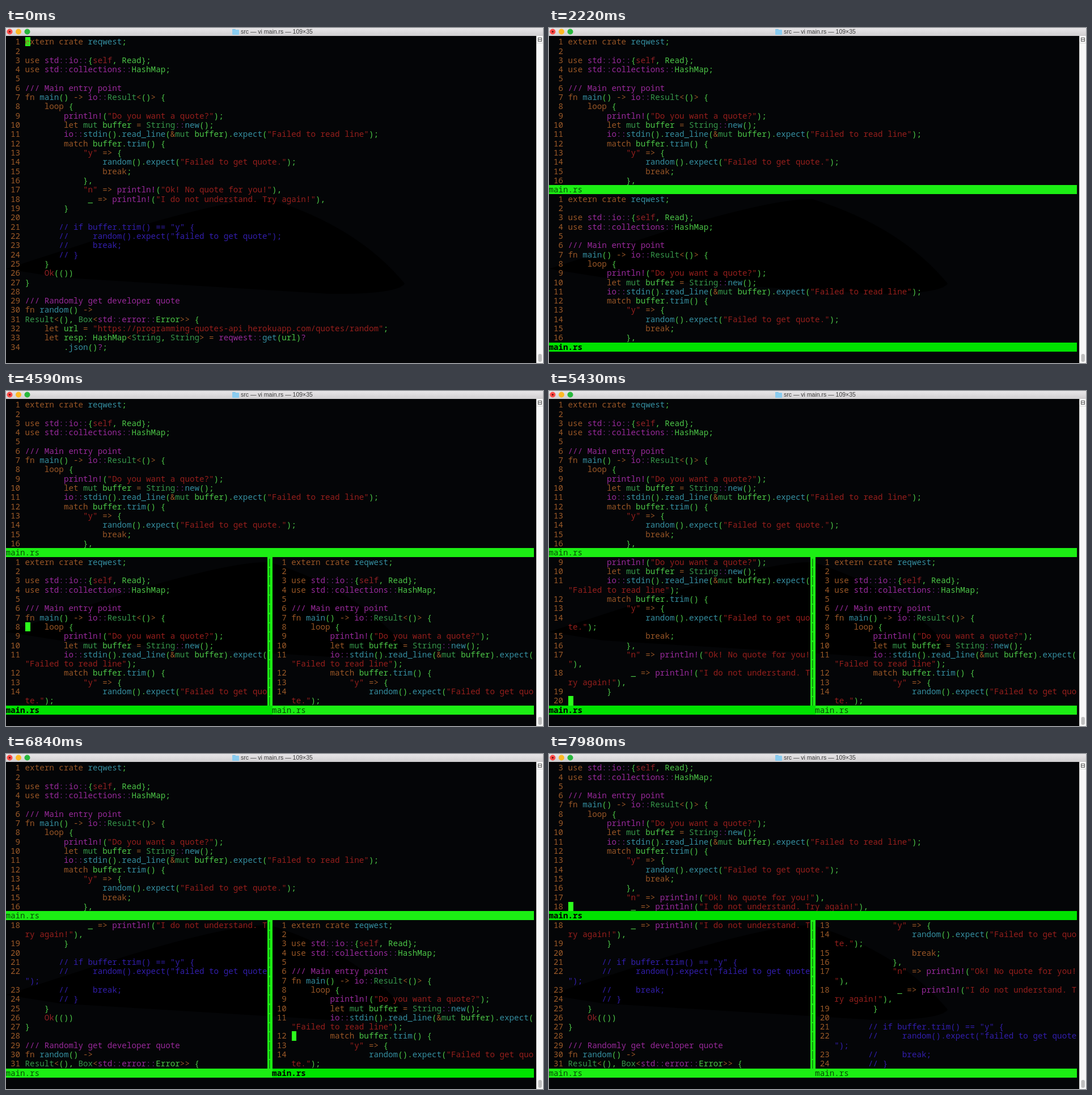
An HTML page with a canvas for the animation above (8 s loop, 947x591 px).

```html
<!DOCTYPE html>
<html lang="en">
<head>
<meta charset="utf-8">
<title>vi split windows</title>
<style>
  html, body { margin: 0; width: 100%; height: 100%; overflow: hidden; background: #000; }
  canvas { display: block; }
</style>
</head>
<body>
<canvas id="stage" width="947" height="591"></canvas>
<script>
const ctx = document.getElementById('stage').getContext('2d');
const LOOP = 8000;
const COLS = 109, CELL_W = 8.54, CELL_H = 16.32, TOP = 16;
const NUMBER_COLS = 4;
const FONT = '14.23px "Noto Sans Mono", "DejaVu Sans Mono", monospace';

const COLORS = {
  doc: '#98299a', comment: '#321eac', string: '#961f1c', keyword: '#985626',
  special: '#932225', type: '#36964a', path: '#982a9c', colons: '#6b267e',
  call: '#358ea0', plain: '#4cc647', number: '#9c5a28'
};
const ACTIVE_BAR = '#00e200', IDLE_BAR = '#1cee14', CURSOR = '#2cff1c';

const TOKEN = new RegExp([
  '(?<doc>///.*)', '(?<comment>//.*)', '(?<string>"[^"]*")',
  '(?<keyword>\\b(?:extern|crate|use|fn|loop|let|match|break)\\b|->|=>|[=<>&])',
  '(?<special>\\b(?:self|Ok)\\b)', '(?<type>\\b(?:mut|Result|String|Box)\\b)',
  '(?<path>\\w+!|\\w+(?=::)|\\?)', '(?<colons>::)',
  '(?<call>\\w+(?=\\()|reqwest)', '(?<plain>\\w+|.)'
].join('|'), 'g');

const SOURCE = `extern crate reqwest;

use std::io::{self, Read};
use std::collections::HashMap;

/// Main entry point
fn main() -> io::Result<()> {
    loop {
        println!("Do you want a quote?");
        let mut buffer = String::new();
        io::stdin().read_line(&mut buffer).expect("Failed to read line");
        match buffer.trim() {
            "y" => {
                random().expect("Failed to get quote.");
                break;
            },
            "n" => println!("Ok! No quote for you!"),
             _ => println!("I do not understand. Try again!"),
        }

       // if buffer.trim() == "y" {
       //     random().expect("failed to get quote");
       //     break;
       // }
    }
    Ok(())
}

/// Randomly get developer quote
fn random() ->
Result<(), Box<std::error::Error>> {
    let url = "https://programming-quotes-api.herokuapp.com/quotes/random";
    let resp: HashMap<String, String> = reqwest::get(url)?
        .json()?;`;

// Each line becomes a list of coloured characters.
const LINES = SOURCE.split('\n').map(line =>
  [...line.matchAll(TOKEN)].flatMap(({ 0: text, groups }) => {
    const kind = Object.keys(groups).find(name => groups[name] !== undefined);
    return [...text].map(char => ({ char, color: COLORS[kind] }));
  }));

const cellX = col => col * CELL_W;
const cellY = row => TOP + row * CELL_H;

function fillCells(row, col, width, color) {
  const x = Math.round(cellX(col)), y = Math.round(cellY(row));
  ctx.fillStyle = color;
  ctx.fillRect(x, y, Math.round(cellX(col + width)) - x, Math.round(cellY(row + 1)) - y);
}

function drawText(text, row, col, color, weight = 300) {
  ctx.font = `${weight} ${FONT}`;
  ctx.fillStyle = color;
  ctx.fillText(text, cellX(col) - 0.6, cellY(row) + 13.2);
}

function rowsOf(line, width) {
  return Math.max(1, Math.ceil(LINES[line - 1].length / (width - NUMBER_COLS)));
}

// First visible line that keeps the cursor line fully inside the window.
function firstLine({ line, width, height }) {
  let top = line, used = rowsOf(line, width);
  while (top > 1 && used + rowsOf(top - 1, width) <= height) used += rowsOf(--top, width);
  return top;
}

function drawWindow(win, active, cursorOn) {
  const { row, col, width, height, line: cursorLine } = win;
  const textCols = width - NUMBER_COLS;
  let used = 0;
  for (let line = firstLine(win); line <= LINES.length && used < height; line++) {
    const rows = rowsOf(line, width);
    if (used + rows > height) {
      for (; used < height; used++) drawText('@', row + used, col, COLORS.comment);
      break;
    }
    if (active && cursorOn && line === cursorLine) {
      fillCells(row + used, col + NUMBER_COLS, 1, CURSOR);
    }
    drawText(String(line).padStart(3), row + used, col, COLORS.number);
    LINES[line - 1].forEach(({ char, color }, i) => {
      if (char === ' ') return;
      drawText(char, row + used + Math.floor(i / textCols), col + NUMBER_COLS + i % textCols, color);
    });
    used += rows;
  }
}

function drawStatus({ row, col, width, height }, active) {
  const barWidth = col + width < COLS ? width + 1 : width;
  fillCells(row + height, col, barWidth, active ? ACTIVE_BAR : IDLE_BAR);
  drawText('main.rs', row + height, col, active ? '#000' : '#064806', active ? 700 : 400);
}

function drawSeparator(row, col, height) {
  for (let i = 0; i < height; i++) {
    fillCells(row + i, col, 1, IDLE_BAR);
    drawText('|', row + i, col, '#064806', 400);
  }
}

function drawBackdrop() {
  ctx.fillStyle = '#040507';
  ctx.fillRect(0, 0, 947, 591);
  ctx.fillStyle = '#000';
  ctx.fill(new Path2D('M0 425 L220 354 Q400 300 465 302 Q620 350 703 451 Q690 470 571 469 L95 440Z'));
}

function disc(x, y, radius, color) {
  ctx.fillStyle = color;
  ctx.beginPath();
  ctx.arc(x, y, radius, 0, 7);
  ctx.fill();
}

function roundBox(x, y, width, height, radius, color) {
  ctx.fillStyle = color;
  ctx.beginPath();
  ctx.roundRect(x, y, width, height, radius);
  ctx.fill();
}

function drawChrome() {
  const bar = ctx.createLinearGradient(0, 0, 0, 14);
  bar.addColorStop(0, '#e8e6e8');
  bar.addColorStop(1, '#d0ced0');
  ctx.fillStyle = bar;
  ctx.fillRect(0, 0, 947, 14);
  ['#fc4b48', '#fdb924', '#28b83c'].forEach((color, i) => disc(6.5 + i * 15.5, 6.5, 5, color));
  disc(6.5, 6.5, 1.6, '#6b0f0c');

  roundBox(399, 2, 6, 4, 1, '#6fbbe6');
  roundBox(399, 3, 12, 9, 1, '#8accf0');
  ctx.font = '10.5px "Liberation Sans", Arial, sans-serif';
  ctx.fillStyle = '#3c3c3c';
  ctx.fillText('src — vi main.rs — 109×35', 414, 10.3);

  ctx.fillStyle = '#f8f8f8';
  ctx.fillRect(935, 14, 12, 577);
  ctx.fillStyle = '#d8d8d8';
  ctx.fillRect(935, 14, 1, 577);
  ctx.fillRect(935, 26, 12, 1);
  ctx.strokeStyle = '#555';
  ctx.lineWidth = 1;
  ctx.strokeRect(938.5, 17.5, 6, 6);
  ctx.fillStyle = '#555';
  ctx.fillRect(939, 20, 6, 1);
  roundBox(938.5, 575, 6.5, 14, 3, '#bfbfbf');
}

// Cursor line while the "down" key repeats.
function heldDown(t, start, interval, last) {
  return Math.max(1, Math.min(last, 2 + Math.floor((t - start) / interval)));
}

function render(t) {
  const split = t >= 800, vsplit = t >= 2700;
  const focus = t < 2000 || t >= 7380 ? 0 : t < 6300 ? 1 : 2;
  const cursorOn = t >= 4180 || t % 1200 < 600;

  const windows = [{ row: 0, col: 0, width: COLS, height: split ? 16 : 34, line: heldDown(t, 7460, 32, 18) }];
  if (split) {
    windows.push({ row: 17, col: 0, width: vsplit ? 54 : COLS, height: 16, line: heldDown(t, 4180, 67, 31) });
  }
  if (vsplit) {
    windows.push({ row: 17, col: 55, width: 54, height: 16, line: heldDown(t, 6480, 33, 24) });
  }

  drawBackdrop();
  windows.forEach((win, i) => {
    drawWindow(win, i === focus, cursorOn);
    if (split) drawStatus(win, i === focus);
  });
  if (vsplit) drawSeparator(17, 54, 16);
  drawChrome();
}

const started = performance.now();
function tick() {
  render((performance.now() - started) % LOOP);
  requestAnimationFrame(tick);
}
tick();
</script>
</body>
</html>
```
